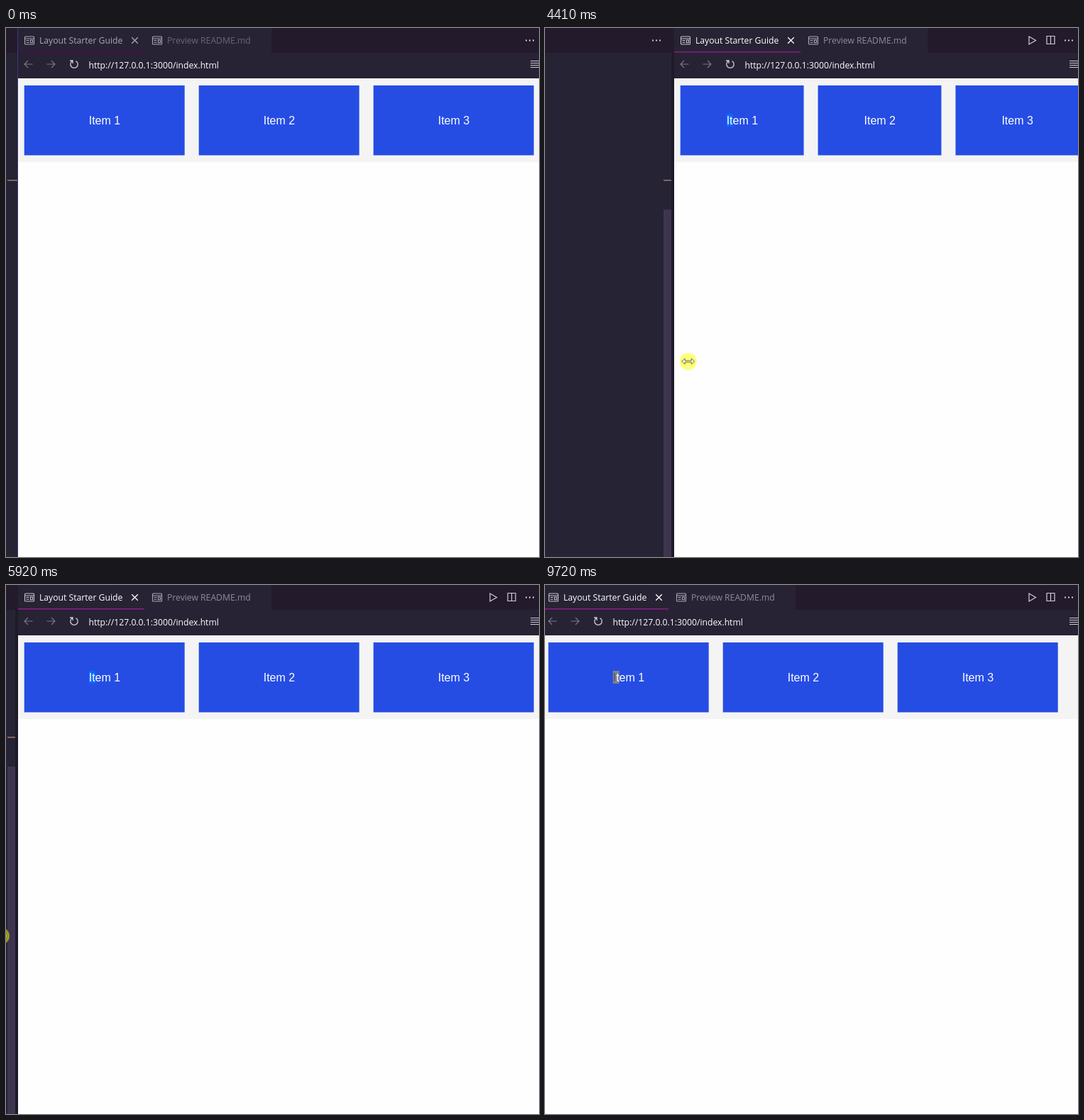
Write an HTML page with a canvas that moves like this. It is 751 by 746 pixels and loops after 9760 ms.

```html
<!DOCTYPE html>
<html lang="en">
<head>
<meta charset="utf-8">
<style>
  html, body { margin: 0; width: 100%; height: 100%; overflow: hidden; background: #fefefe; }
  canvas { display: block; }
</style>
</head>
<body>
<canvas id="stage" width="751" height="746"></canvas>
<script>
const ctx = document.getElementById('stage').getContext('2d');
const LOOP = 9760, W = 751, H = 746;
const UI = '12.2px "Open Sans", sans-serif';
const ITEM = '16px "Liberation Sans", Arial, sans-serif';

// [time, left edge of the preview pane]
const edgeKeys = [[3560, 17], [3880, 18], [3950, 24], [4400, 180], [4760, 252], [4850, 256],
  [4920, 255], [5550, 82], [5920, 17], [6070, -4], [6330, -4], [6500, 5], [7030, 117],
  [7450, 213], [7620, 207], [8060, 68], [8300, 4], [8600, 36], [8970, -4]];
// [time, x, y]
const pointerKeys = [[20, 634, 765], [450, 300, 600], [860, 16, 480], [1620, 20, 478], [1950, 265, 470],
  [2150, 265, 470], [2450, 128, 476], [2610, 128, 476], [2850, 20, 474], [3560, 19, 474],
  [3950, 57, 465], [4400, 200, 470], [4760, 256, 476], [4920, 253, 477], [5550, 66, 490],
  [5920, -7, 495], [6070, -30, 496], [6330, -20, 496], [7030, 128, 496], [7400, 215, 493],
  [7600, 205, 496], [8060, 21, 508], [8250, -30, 510]];

const clamp01 = v => Math.max(0, Math.min(1, v));

function sample(keys, t, column) {
  const next = keys.findIndex(key => key[0] > t);
  if (next === 0) return keys[0][column];
  if (next < 0) return keys[keys.length - 1][column];
  const a = keys[next - 1], b = keys[next];
  return a[column] + (b[column] - a[column]) * (t - a[0]) / (b[0] - a[0]);
}

function rect(x, y, w, h, color) {
  ctx.fillStyle = color;
  ctx.fillRect(x, y, w, h);
}

function text(str, x, y, color, font = UI) {
  ctx.font = font;
  ctx.fillStyle = color;
  ctx.fillText(str, x, y);
}

function icon(x, y, path, color, width = 1.1) {
  ctx.save();
  ctx.translate(x, y);
  ctx.strokeStyle = color;
  ctx.lineWidth = width;
  ctx.stroke(new Path2D(path));
  ctx.restore();
}

function dots(x, color) {
  for (let i = -1; i <= 1; i++) rect(x + i * 5 - 1, 16.5, 2, 2, color);
}

const PREVIEW = 'M1.5 .5H12.5Q13.5 .5 13.5 1.5V10.5Q13.5 11.5 12.5 11.5H1.5Q.5 11.5 .5 10.5V1.5Q.5 .5 1.5 .5Z' +
  'M.5 3.5H13.5M2.5 6H6.5M2.5 8.8H6.5M8.5 5.5H11.5V9.2H8.5Z';
const CLOSE = 'M-4.3 -4.3L4.3 4.3M4.3 -4.3L-4.3 4.3';
const BACK = 'M6 0H-5.5M-.5 -5L-5.5 0L-.5 5';
const FORWARD = 'M-6 0H5.5M.5 -5L5.5 0L.5 5';
const RELOAD = 'M-2.5 -4.4A5.2 5.2 0 1 0 2.5 -4.4M-6 -5H-2V-1';
const PLAY = 'M-4 -5.5L5.5 0L-4 5.5Z';
const SPLIT = 'M-5.5 -5.5H5.5V5.5H-5.5ZM0 -5.5V5.5';
const RESIZE = 'M-9 0L-4.5 -4V-1H4.5V-4L9 0L4.5 4V1H-4.5V4Z';
const ARROW = 'M0 0V14L3.3 11L5.5 16L7.6 15L5.4 10.2H10Z';

function drawEditor(t, x) {
  rect(0, 0, x, 35, '#231a2c');
  rect(0, 35, x, H, '#262334');
  dots(x - 25, '#c9c6d0');
  const dragged = t >= 3560;
  rect(x - 15, 214, dragged ? 11 : 14, 1.5, '#9b7c72');
  ctx.globalAlpha = 0.6 * clamp01((t - 700) / 160) + 0.4 * clamp01((t - 1250) / 90);
  rect(x - 15, 256, 12, H, '#3d3550');
  ctx.globalAlpha = 1;
  if (dragged) rect(x - 4, 35, 4, H, '#1e1b29');
  else rect(x - 1, 0, 1, H, '#3c3a78');
}

function drawChrome(x, focused) {
  const bright = focused ? '#ffffff' : '#a9a6b4';
  const dim = focused ? '#8f8c9b' : '#6b6777';
  const nav = '#7c7988';
  rect(x, 0, W - x, 35, '#231a2c');
  rect(x, 0, 357, 35, '#272334');
  rect(x, 35, W - x, 36, '#272234');
  rect(x, 33, 178, 1.5, focused ? '#8c1c88' : '#500d55');
  icon(x + 9, 11.5, PREVIEW, focused ? '#c5c2cc' : '#aaa7b3');
  text('Layout Starter Guide', x + 30, 22, bright);
  icon(x + 164.5, 17.5, CLOSE, bright, 1.3);
  icon(x + 189, 11.5, PREVIEW, '#aaa7b3');
  text('Preview README.md', x + 210, 22, dim);
  if (focused) {
    icon(686, 17.5, PLAY, '#d0cdd6', 1.2);
    icon(712.5, 17, SPLIT, '#d0cdd6', 1.2);
  }
  dots(738, '#d0cdd6');
  icon(x + 14.5, 51, BACK, nav);
  icon(x + 46.5, 51, FORWARD, nav);
  icon(x + 79, 51, RELOAD, '#d0cdd6', 1.3);
  text('http://127.0.0.1:3000/index.html', x + 99.5, 56.5, '#ffffff');
  for (let i = 0; i < 4; i++) rect(739, 46 + i * 3, 12, 1, '#d0cdd6');
}

function drawPage(t, x, selected) {
  rect(x, 71, W - x, H, '#fefefe');
  rect(x, 71, W - x, 118, '#f4f4f4');
  const pitch = Math.min(246, 253.3 - 0.3265 * x);
  const width = pitch - 20;
  for (let i = 0; i < 3; i++) {
    const left = x + 8.7 + i * pitch;
    const label = left + width / 2 - 22;
    const blurred = t >= 9720;
    rect(left, 81, width, 98.5, '#254de4');
    if (!i && selected) rect(label, 121, 9, 18, blurred ? '#7f8294' : '#0b68fb');
    text('Item ' + (i + 1), label, 136, '#ffffff', ITEM);
    if (!i && blurred) text('I', label, 136, '#303442', ITEM);
  }
}

function drawPointer(t) {
  if (t < 20) return;
  const x = sample(pointerKeys, t, 1), y = sample(pointerKeys, t, 2);
  ctx.fillStyle = 'rgba(255, 255, 0, .52)';
  ctx.beginPath();
  ctx.arc(x, y, 12, 0, Math.PI * 2);
  ctx.fill();
  const shape = t >= 3010 ? RESIZE : ARROW;
  ctx.save();
  ctx.translate(x, y);
  ctx.fillStyle = '#ffffe8';
  ctx.fill(new Path2D(shape));
  ctx.restore();
  icon(x, y, shape, '#4d4a20', 0.8);
}

function draw() {
  const t = performance.now() % LOOP;
  const x = Math.round(sample(edgeKeys, t, 1));
  const focused = t >= 1660;
  drawEditor(t, x);
  drawChrome(x, focused);
  drawPage(t, x, t >= 1900);
  drawPointer(t);
  requestAnimationFrame(draw);
}
draw();
</script>
</body>
</html>
```
